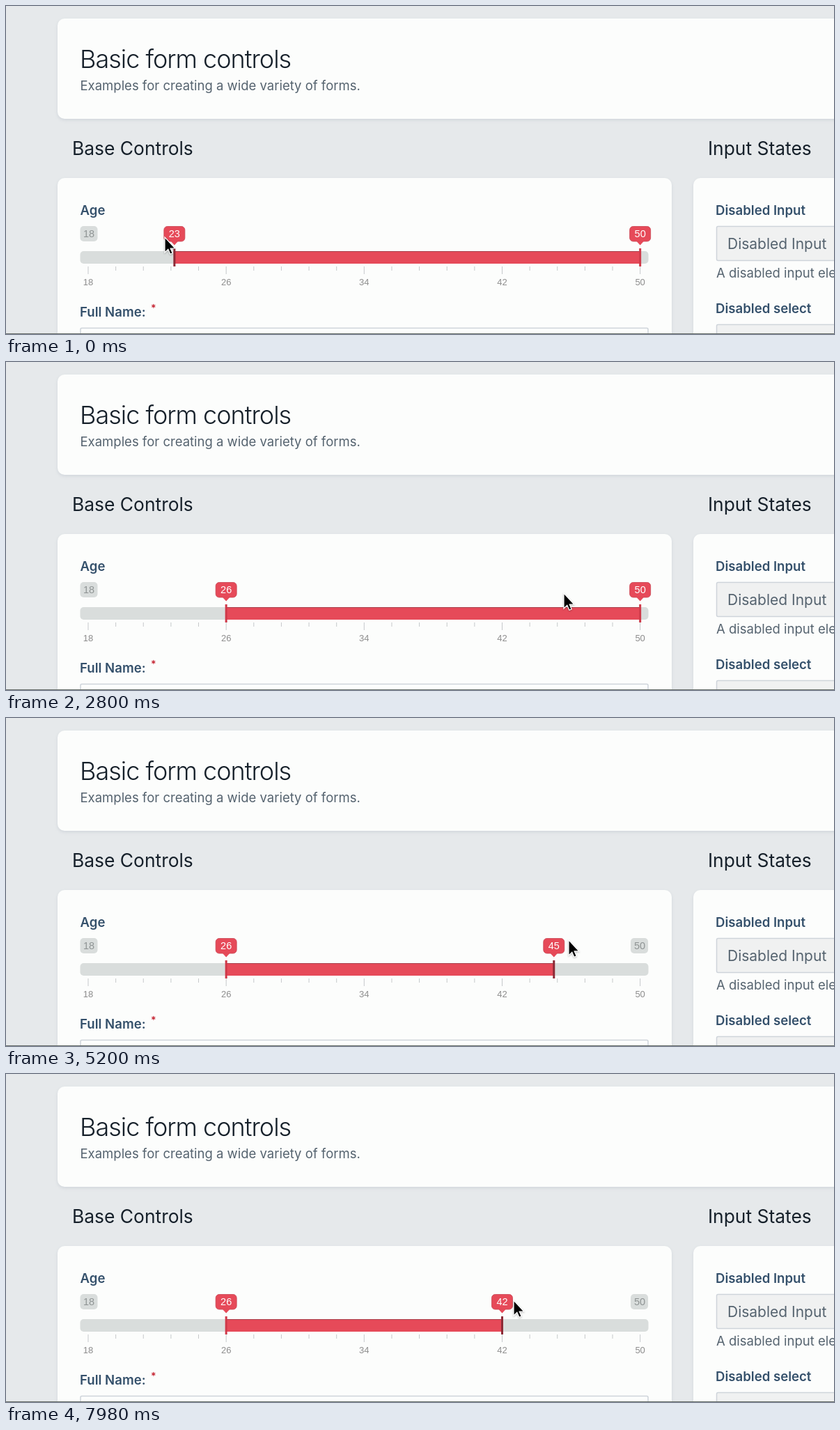
An HTML page that plays this animation: 1189 px wide and 471 px high, repeating every 8000 ms.

```html
<!DOCTYPE html>
<html lang="en">
<head>
<meta charset="utf-8">
<title>Range slider</title>
<style>
html, body { margin: 0; width: 100%; height: 100%; overflow: hidden; background: #e6e9eb; }
svg { display: block; font: 18.5px Inter, sans-serif; fill: #55636f; }
.card { fill: #fcfdfc; filter: drop-shadow(0 2px 2px #8898a838); }
.label { font-size: 18.6px; font-weight: 600; fill: #34506b; }
.head { font-size: 26.4px; fill: #16202a; }
.field { stroke: #ced4da; stroke-width: 1.5; }
.num { font: 13px "Liberation Sans", Arial, sans-serif; text-anchor: middle; fill: #8d8d8d; }
.tag { font: 14.5px "Liberation Sans", Arial, sans-serif; text-anchor: middle; fill: #fff; }
.limit text { fill: #8f9494; }
.limit rect, .track { fill: #d9dddc; }
.red { fill: #e64a59; }
</style>
</head>
<body>
<svg width="1189" height="471">
  <rect class="card" x="74" y="18" width="1140" height="144" rx="10"/>
  <rect class="card" x="74" y="247" width="882" height="260" rx="10"/>
  <rect class="card" x="987" y="247" width="240" height="260" rx="10"/>
  <text x="106" y="88.500" style="font-size:36px;font-weight:300;letter-spacing:-1px;fill:#16202a">Basic form controls</text>
  <text x="106.500" y="121">Examples for creating a wide variety of forms.</text>
  <text class="head" x="95" y="214">Base Controls</text>
  <text class="head" x="1008" y="214">Input States</text>
  <text class="label" x="106.500" y="300">Age</text>
  <text class="label" x="106" y="446">Full Name:</text>
  <text x="208" y="439" style="font-size:14px;font-weight:600;fill:#c4202f">*</text>
  <rect class="field" x="107" y="462.500" width="815" height="50" rx="2" fill="#fcfdfc"/>
  <text class="label" x="1019" y="300">Disabled Input</text>
  <rect class="field" x="1020.500" y="316.500" width="200" height="49" rx="2" fill="#f0f1f1"/>
  <text x="1036" y="349" style="font-size:21px">Disabled Input</text>
  <text x="1020" y="390">A disabled input element.</text>
  <text class="label" x="1019" y="441">Disabled select</text>
  <rect class="field" x="1020.500" y="457.500" width="200" height="49" rx="2" fill="#f0f1f1"/>

  <rect class="track" x="106.500" y="352" width="816" height="18" rx="5"/>
  <g id="ticks"></g>
  <g class="limit"><rect x="106.500" y="316" width="25" height="22" rx="5"/><text class="tag" x="119" y="332">18</text></g>
  <g class="limit" id="max"><rect x="897" y="316" width="25" height="22" rx="5"/><text class="tag" x="910" y="332">50</text></g>
  <rect id="bar" class="red" y="352" height="18"/>
  <rect id="edge" fill="#a8404c" y="352" height="1"/>
  <g id="from"></g>
  <g id="to"></g>
  <rect y="470" width="1189" height="1" fill="#6a716c"/>
  <path id="cursor" d="M1 1V23L5.800 18.300 8.900 25.300 12.200 23.900 9.200 17H15.800Z" fill="#000" stroke="#fff" stroke-width="1.200" style="filter:drop-shadow(0 1px 1px #0004)"/>
</svg>
<script>
const $ = id => document.getElementById(id);
const MIN = 18, MAX = 50, LEFT = 118, UNIT = 24.77;
const toX = value => LEFT + (value - MIN) * UNIT;
const toValue = x => Math.min(MAX, Math.max(MIN, MIN + Math.round((x - LEFT) / UNIT)));

// Pointer stops: time, x, y
const path = [
  [0, 227, 331], [250, 228, 331], [1400, 315, 332], [1900, 315, 332], [2800, 800, 331],
  [3500, 896, 325], [4300, 903, 318], [4740, 889, 317], [5720, 709, 319], [6250, 675, 320],
  [6800, 675, 320], [7600, 728, 324], [8000, 728, 324]
];

function pointer(t) {
  const i = path.findIndex(p => p[0] > t), [a, b] = [path[i - 1], path[i]];
  const u = (t - a[0]) / (b[0] - a[0]), k = u * u * (3 - 2 * u);
  return [1, 2].map(n => a[n] + (b[n] - a[n]) * k);
}

for (let i = 0; i <= 20; i++) {
  const x = LEFT + i * 39.632, big = i % 5 === 0;
  $('ticks').innerHTML += `<rect x="${x - .5}" y="374" width="1" height="${big ? 11 : 6}" fill="#c6c9cb"/>` +
    (big ? `<text class="num" x="${x}" y="401">${MIN + i / 5 * 8}</text>` : '');
}

for (const id of ['from', 'to']) {
  $(id).innerHTML = `<rect class="red" x="-15" y="316.500" width="30" height="21.500" rx="5" stroke="#c84552" stroke-width=".8"/>
    <path class="red" d="M-5.500 337.500H5.500L0 343.500Z"/>
    <text class="tag" y="332"></text><rect class="grip" x="-1.500" y="348" width="3" height="26"/>`;
}

function setHandle(id, value, active) {
  const g = $(id);
  g.setAttribute('transform', `translate(${toX(value)})`);
  g.querySelector('text').textContent = value;
  g.querySelector('.grip').setAttribute('fill', active ? '#8c2a36' : '#cf3a4a');
}

function draw(now) {
  const t = now % 8000, [x, y] = pointer(t);
  const from = t < 1700 ? toValue(x + 5) : 26;
  const to = t < 4800 ? MAX : toValue(x - 8);
  setHandle('from', from, t < 1900);
  setHandle('to', to, t > 3500);
  for (const id of ['bar', 'edge']) {
    $(id).setAttribute('x', toX(from));
    $(id).setAttribute('width', toX(to) - toX(from));
  }
  $('max').style.display = to < 49 ? '' : 'none';
  $('cursor').setAttribute('transform', `translate(${x} ${y})`);
  requestAnimationFrame(draw);
}
requestAnimationFrame(draw);
</script>
</body>
</html>
```
